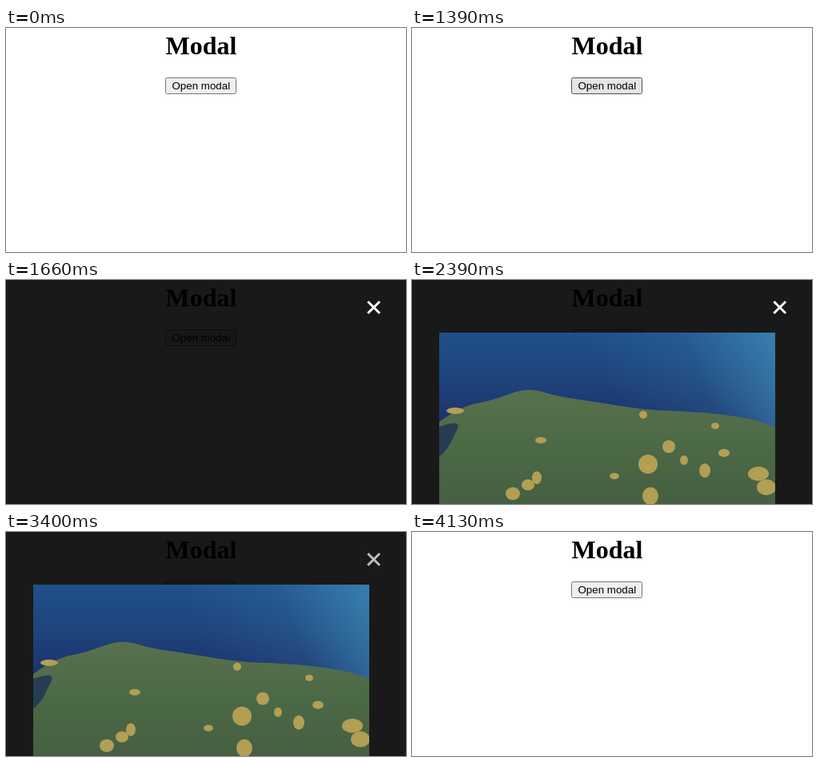
Animation of 500x281 px, one loop 5.39 s. Source, as an HTML page with a canvas:

```html
<!DOCTYPE html>
<html lang="en">
<head>
<meta charset="utf-8">
<title>Modal</title>
<style>
  html, body { margin: 0; height: 100%; overflow: hidden; background: #fff; }
  canvas { display: block; width: 500px; height: 281px; }
</style>
</head>
<body>
<canvas id="stage" width="500" height="281"></canvas>
<script>
const W = 500, H = 281, LOOP = 5390;
const TIME = { press: 1390, release: 1590, open: 1660, photo: 2390, hover: 3200, close: 4130 };
const ctx = document.getElementById('stage').getContext('2d', { alpha: false });

const BUTTON = {
  idle: ['#efefef', '#767676'],
  hover: ['#e5e5e5', '#4f4f4f'],
  active: ['#f5f5f5', '#8d8d8d']
};

function rect(x, y, w, h, fill) {
  ctx.fillStyle = fill;
  ctx.fillRect(x, y, w, h);
}

function text(str, x, y, font) {
  ctx.font = font;
  ctx.fillStyle = '#000';
  ctx.fillText(str, x, y);
}

function gradient(x0, y0, x1, y1, colors) {
  const g = ctx.createLinearGradient(x0, y0, x1, y1);
  colors.forEach((c, i) => g.addColorStop(i / (colors.length - 1), c));
  return g;
}

function smoothLine(points) {
  ctx.moveTo(...points[0]);
  for (let i = 1; i < points.length - 1; i++) {
    const [x, y] = points[i], [nx, ny] = points[i + 1];
    ctx.quadraticCurveTo(x, y, (x + nx) / 2, (y + ny) / 2);
  }
  ctx.lineTo(...points[points.length - 1]);
}

function ellipse(x, y, rx, ry, fill) {
  ctx.fillStyle = fill;
  ctx.beginPath();
  ctx.ellipse(x, y, rx, ry, 0, 0, Math.PI * 2);
  ctx.fill();
}

function drawPage(state) {
  const [fill, border] = BUTTON[state];
  rect(0, 0, W, H, '#fff');
  text('Modal', 199.5, 33, 'bold 32px "Liberation Serif", "Times New Roman", serif');
  ctx.beginPath();
  ctx.roundRect(199.5, 62.5, 88, 20, 2);
  ctx.fillStyle = fill;
  ctx.fill();
  ctx.strokeStyle = border;
  ctx.lineWidth = 1;
  ctx.stroke();
  text('Open modal', 207.5, 77, '13.333px "Liberation Sans", Arial, sans-serif');
}

// Soft stand-in for the landscape: a lake behind a wooded headland.
function drawPhoto() {
  ctx.save();
  ctx.beginPath();
  ctx.rect(34, 66, 420, 215);
  ctx.clip();
  rect(34, 66, 420, 215, gradient(0, 66, 0, 185, ['#20508a', '#1e437c', '#1c3069']));
  rect(34, 66, 420, 120, gradient(250, 150, 454, 66,
    ['rgba(60,135,180,0)', 'rgba(60,135,180,.2)', 'rgba(60,135,180,.85)']));

  ctx.beginPath();
  smoothLine([[34, 178], [60, 159], [100, 151], [132, 139], [152, 137], [182, 146],
    [230, 153], [290, 163], [350, 165], [400, 170], [435, 177], [454, 184]]);
  ctx.lineTo(454, 281);
  ctx.lineTo(34, 281);
  ctx.fillStyle = gradient(0, 140, 0, 281, ['#58704e', '#4b6946', '#465f42']);
  ctx.fill();

  ctx.beginPath();
  smoothLine([[34, 184], [50, 179], [60, 181], [52, 196], [46, 210], [34, 222]]);
  ctx.fillStyle = '#263c53';
  ctx.fill();

  const trees = [[54, 164, 11, 4], [289, 169, 5, 5], [321, 209, 8, 8], [295, 231, 12, 12],
    [298, 271, 10, 11], [366, 239, 7, 9], [379, 183, 5, 4], [390, 217, 7, 5],
    [433, 243, 13, 9], [443, 260, 12, 10], [126, 268, 9, 8], [145, 257, 8, 7],
    [156, 248, 6, 8], [161, 201, 7, 4], [253, 246, 6, 4], [340, 226, 5, 6]];
  trees.forEach(t => ellipse(...t, '#b29f54'));
  ctx.restore();
}

function drawCross(shade) {
  const x = 459.7, y = 34.4, r = 7.4;
  ctx.strokeStyle = `rgb(${shade},${shade},${shade})`;
  ctx.lineWidth = 3;
  ctx.beginPath();
  ctx.moveTo(x - r, y - r);
  ctx.lineTo(x + r, y + r);
  ctx.moveTo(x + r, y - r);
  ctx.lineTo(x - r, y + r);
  ctx.stroke();
}

function buttonState(t) {
  if (t < TIME.press || t >= TIME.open) return 'idle';
  return t < TIME.release ? 'hover' : 'active';
}

function draw(t) {
  drawPage(buttonState(t));
  if (t < TIME.open || t >= TIME.close) return;
  rect(0, 0, W, H, 'rgba(0,0,0,.9)');
  if (t >= TIME.photo) drawPhoto();
  const step = Math.floor((t - TIME.hover) / (200 / 3) + 1e-6) + 1;
  const fade = Math.min(4, Math.max(0, step)) / 4;
  drawCross(Math.round(252 - 62 * fade));
}

const start = performance.now();
function frame() {
  draw((performance.now() - start) % LOOP);
  requestAnimationFrame(frame);
}
frame();
</script>
</body>
</html>
```
